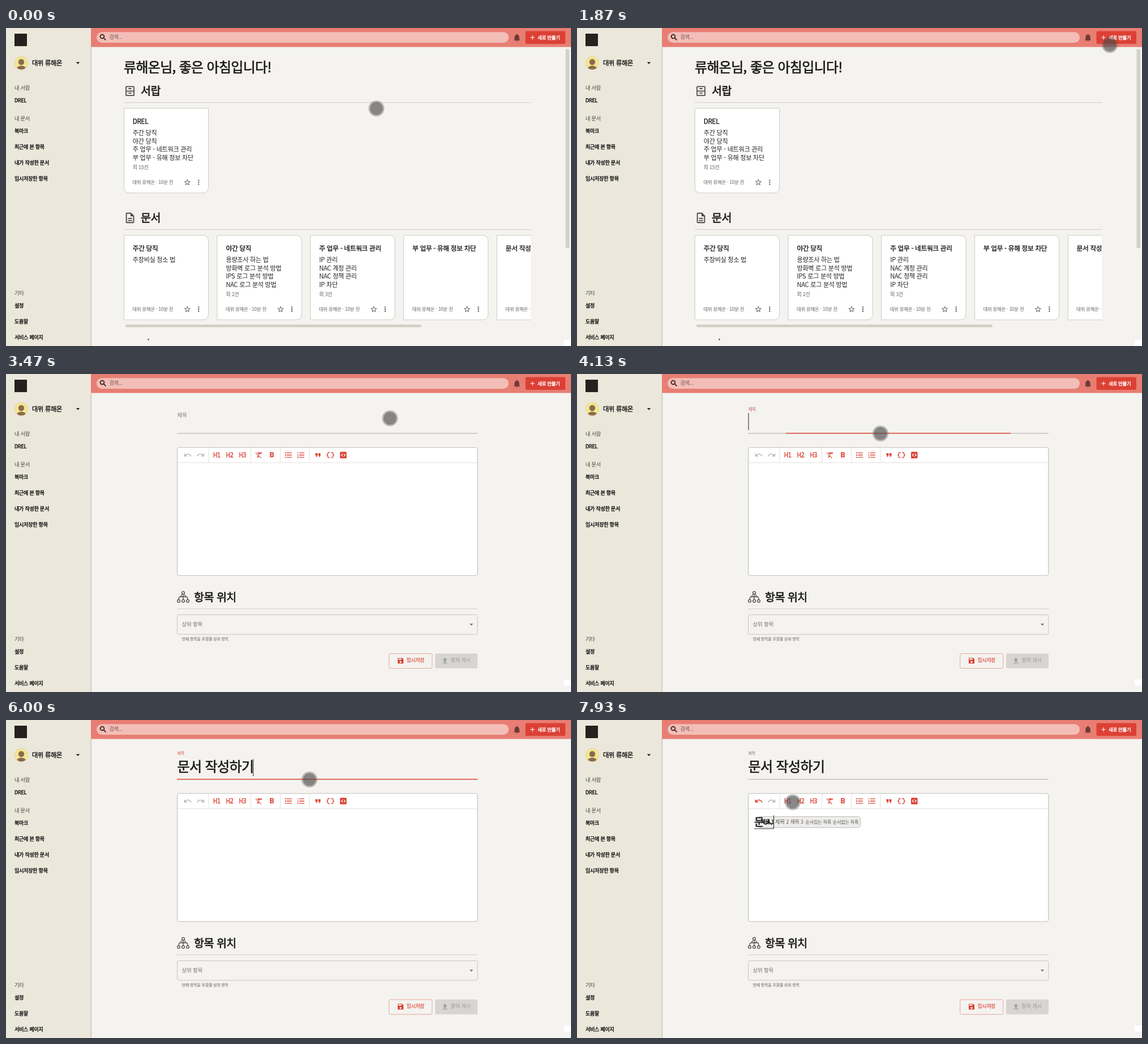
Write an HTML page that moves like this. It is 998 by 561 pixels and loops after 8000 ms.

```html
<!DOCTYPE html>
<html lang="ko">
<head>
<meta charset="utf-8">
<title>문서 작성하기</title>
<style>
html, body { margin: 0; width: 100%; height: 100%; overflow: hidden; background: #f4f3ef; }
svg { display: block; width: 100%; height: 100%; }
text { font-family: "Noto Sans CJK KR", "Noto Sans CJK", sans-serif; letter-spacing: -.025em; white-space: pre; }
.mono { font-family: "Noto Sans Mono", monospace; }
</style>
</head>
<body>
<svg id="stage" viewBox="0 0 998 561" xmlns="http://www.w3.org/2000/svg"></svg>
<script>
const LOOP = 8000;
const INK = '#1a1918', RED = '#dc4034', GREY = '#74736f', LINE = '#cfcecb';
const USER = '류해온', TEAM = 'DREL';

const ICONS = {
  undo: 'M12.5 8c-2.65 0-5.05.99-6.9 2.6L2 7v9h9l-3.62-3.62c1.39-1.16 3.16-1.88 5.12-1.88 3.54 0 6.55 2.31 7.6 5.5l2.37-.78C21.08 11.03 17.15 8 12.5 8z',
  clear: 'M3.27 5L2 6.27l6.97 6.97L6.5 19h3l1.57-3.66L16.73 21 18 19.73 3.55 5.27zM6 5v.18L8.82 8h2.4l-.72 1.68 2.1 2.1L14.21 8H20V5z',
  bold: 'M15.6 10.79c.97-.67 1.65-1.77 1.65-2.79 0-2.26-1.75-4-4-4H7v14h7.04c2.09 0 3.71-1.7 3.71-3.79 0-1.52-.86-2.82-2.15-3.42zM10 6.5h3c.83 0 1.5.67 1.5 1.5s-.67 1.5-1.5 1.5h-3zm3.5 9H10v-3h3.5c.83 0 1.5.67 1.5 1.5s-.67 1.5-1.5 1.5z',
  bullets: 'M2.5 4.5h3v3h-3zM2.5 10.5h3v3h-3zM2.5 16.5h3v3h-3zM7 5h14v2H7zM7 11h14v2H7zM7 17h14v2H7z',
  numbers: 'M2 17h2v.5H3v1h1v.5H2v1h3v-4H2zm1-9h1V4H2v1h1zm-1 3h1.8L2 13.1v.9h3v-1H3.2L5 10.9V10H2zM7 5v2h14V5zm0 14h14v-2H7zm0-6h14v-2H7z',
  quote: 'M6 17h3l2-4V7H5v6h3zm8 0h3l2-4V7h-6v6h3z',
  brace: 'M4 7v2c0 .55-.45 1-1 1H2v4h1c.55 0 1 .45 1 1v2c0 1.65 1.35 3 3 3h3v-2H7c-.55 0-1-.45-1-1v-2c0-1.3-.84-2.42-2-2.83v-.34C5.16 11.42 6 10.3 6 9V7c0-.55.45-1 1-1h3V4H7C5.35 4 4 5.35 4 7z',
  star: 'M22 9.24l-7.19-.62L12 2 9.19 8.63 2 9.24l5.46 4.73L5.82 21 12 17.27 18.18 21l-1.63-7.03zM12 15.4l-3.76 2.27 1-4.28-3.32-2.88 4.38-.38L12 6.1l1.71 4.04 4.38.38-3.32 2.88 1 4.28z',
  more: 'M10.2 4.2h3.6v3.6h-3.6zM10.2 10.2h3.6v3.6h-3.6zM10.2 16.2h3.6v3.6h-3.6z',
  search: 'M15.5 14h-.79l-.28-.27C15.41 12.59 16 11.11 16 9.5 16 5.91 13.09 3 9.5 3S3 5.91 3 9.5 5.91 16 9.5 16c1.61 0 3.09-.59 4.23-1.57l.27.28v.79l5 4.99L20.49 19zm-6 0C7.01 14 5 11.99 5 9.5S7.01 5 9.5 5 14 7.01 14 9.5 11.99 14 9.5 14z',
  bell: 'M12 22c1.1 0 2-.9 2-2h-4c0 1.1.89 2 2 2zm6-6v-5c0-3.07-1.64-5.64-4.5-6.32V4c0-.83-.67-1.5-1.5-1.5s-1.5.67-1.5 1.5v.68C7.63 5.36 6 7.92 6 11v5l-2 2v1h16v-1z',
  down: 'M7 10l5 5 5-5z',
  add: 'M19 13h-6v6h-2v-6H5v-2h6V5h2v6h6z',
  save: 'M17 3H5c-1.11 0-2 .9-2 2v14c0 1.1.89 2 2 2h14c1.1 0 2-.9 2-2V7zm-5 16c-1.66 0-3-1.34-3-3s1.34-3 3-3 3 1.34 3 3-1.34 3-3 3zm3-10H5V5h10z',
  publish: 'M9 16h6v-6h4l-7-7-7 7h4zm-4 2h14v2H5z',
  doc: 'M8 16h8v2H8zm0-4h8v2H8zm6-10H6c-1.1 0-2 .9-2 2v16c0 1.1.89 2 1.99 2H18c1.1 0 2-.9 2-2V8zm4 18H6V4h7v5h5z',
  drawer: 'M5 2h14c1.1 0 2 .9 2 2v16c0 1.1-.9 2-2 2H5c-1.1 0-2-.9-2-2V4c0-1.1.9-2 2-2zM5 4v7h14V4zM5 13v7h14v-7zM9 6h6v2.2H9zM9 15h6v2.2H9z'
};

// cx, cy: centre of the icon; bold: outline width that thickens the glyphs
const text = (x, cy, str, size, fill = INK, bold = 0, extra = '') =>
  `<text x="${x}" y="${cy + size * .37}" font-size="${size}" fill="${fill}" stroke="${fill}" stroke-width="${bold}" ${extra}>${str}</text>`;
const icon = (name, cx, cy, size, fill, flip = 1, extra = '') =>
  `<path d="${ICONS[name]}" fill="${fill}" fill-rule="evenodd" ${extra} transform="translate(${cx} ${cy}) scale(${flip * size / 24} ${size / 24}) translate(-12 -12)"/>`;
const rect = (x, y, w, h, fill, r = 0, extra = '') =>
  `<rect x="${x}" y="${y}" width="${w}" height="${h}" rx="${r}" fill="${fill}" ${extra}/>`;
const outline = (color, w = 1) => `stroke="${color}" stroke-width="${w}"`;

function sidebar() {
  const label = (y, s) => text(15, y, s, 9.2, '#5a5953', .1);
  const item = (y, s) => text(15, y, s, 9, '#100f0e', .4);
  return rect(0, 0, 150, 561, '#ebe8db') +
    rect(149.5, 34, 2.5, 527, 'url(#edge)') +
    rect(15, 10, 22, 22, '#26211f') +
    `<circle cx="27" cy="62" r="11.7" fill="#f2e690" ${outline('#d9cf86', .6)}/>
     <g clip-path="url(#face)" fill="#8b6a4e"><circle cx="27" cy="60" r="5.2"/><ellipse cx="27" cy="73" rx="9" ry="6.5"/></g>` +
    text(46, 62, '대위 ' + USER, 11.2, '#100f0e', .35) +
    icon('down', 127, 61.5, 16, '#161513') +
    label(106, '내 서랍') + item(128, TEAM) + label(160, '내 문서') +
    ['북마크', '최근에 본 항목', '내가 작성한 문서', '임시저장한 항목'].map((s, i) => item(182 + 28 * i, s)).join('') +
    label(468, '기타') +
    ['설정', '도움말', '서비스 페이지'].map((s, i) => item(490 + 28 * i, s)).join('');
}

function topbar() {
  return rect(150, 0, 848, 33.5, '#e87e73') +
    rect(160, 7.3, 728, 18.7, '#f3beb7', 9.35) +
    icon('search', 171.5, 16.5, 15, '#2b1614', 1, outline('#2b1614', .7)) +
    text(182.5, 16, '검색...', 9, '#7d5f5c', .1) +
    icon('bell', 902.5, 17, 16.5, '#6c3a35') +
    rect(917.5, 5.5, 70.5, 22.5, '#dc4034', 2) +
    icon('add', 930, 16.7, 13, '#fff') +
    text(939, 16.5, '새로 만들기', 8.4, '#fff', .35);
}

function card(x, y, title, lines, more, drawer) {
  const w = 149.2, b = y + w, r = x + w;
  const shape = drawer
    ? `M${x} ${y}H${r}V${b - 10}q0 10-10 10H${x + 10}q-10 0-10-10z`
    : `M${x} ${y}H${r - 10}q10 0 10 10V${b - 10}q0 10-10 10H${x}z`;
  const end = y + 44 + 14.4 * lines.length;
  return `<path d="${shape}" fill="#fff" ${outline('#cbcac7')}/>` +
    text(x + 15.5, y + 23, title, 11.65, INK, .35) +
    lines.map((s, i) => text(x + 15.5, y + 43.5 + 14.4 * i, s, 11.1, '#222120')).join('') +
    (more ? text(x + 15.5, end + 2, more, 8.9, GREY, .1) : '') +
    text(x + 15, b - 18.8, `대위 ${USER} · 10분 전`, 8.4, GREY, .1) +
    icon('star', x + 112, b - 18.8, 14, '#5f5e5b') +
    icon('more', x + 132, b - 18.8, 14, '#5f5e5b');
}

function home() {
  const duty = ['주간 당직', '야간 당직', '주 업무 - 네트워크 관리', '부 업무 - 유해 정보 차단'];
  const docs = [
    [duty[0], ['주장비실 청소 법']],
    [duty[1], ['용량조사 하는 법', '방화벽 로그 분석 방법', 'IPS 로그 분석 방법', 'NAC 로그 분석 방법'], '외 2건'],
    [duty[2], ['IP 관리', 'NAC 계정 관리', 'NAC 정책 관리', 'IP 차단'], '외 3건'],
    [duty[3], []],
    ['문서 작성하기', []]
  ];
  return text(208, 69, USER + '님, 좋은 아침입니다!', 23.9, INK, .65) +
    icon('drawer', 219, 111.3, 21, '#4a4947') + text(238, 111, '서랍', 19.5, INK, .65) +
    rect(208, 131, 719, 1, LINE) +
    card(208.3, 141.8, TEAM, duty, '외 15건', true) +
    icon('doc', 219, 335, 22, '#4a4947') + text(238, 334.5, '문서', 19.5, INK, .65) +
    rect(208, 355, 719, 1, LINE) +
    `<g clip-path="url(#shelf)">${docs.map((d, i) => card(208.3 + 164.7 * i, 365.7, ...d)).join('')}</g>` +
    rect(211, 523.3, 523, 4.4, '#d0cec5', 2) +
    rect(988.5, 37, 6.5, 351.5, '#d2d0c8', 3) +
    rect(250.5, 548.5, 2, 2, INK) +
    rect(985, 550, 13, 11, '#fff');
}

function treeIcon() {
  const dots = [[313, 386], [305, 400.5], [313, 400.5], [321, 400.5]];
  return `<g fill="none" ${outline('#4a4947', 1.3)}>` +
    dots.map(([x, y]) => `<circle cx="${x}" cy="${y}" r="2.4"/>`).join('') +
    '<path d="M313 388.5V398M305 398q0-5 3-5h10q3 0 3 5M308 393l3-4.5M318 393l-3-4.5"/></g>';
}

function editor() {
  const y = 143;
  return rect(302, 104.2, 531, 1, '#aeadaa') +
    `<rect id="focus" x="302" y="103.7" height="1.7" fill="#de5348"/>` +
    text(0, 0, '제목', 9.4, GREY, 0, 'id="label"') +
    text(302.5, 82.5, '', 24, INK, .6, 'id="title"') +
    rect(302.5, 129.5, 530.3, 226, '#fff', 4, outline('#c4c3c0', 1.2)) +
    rect(303, 156, 529.5, 1, '#e3e2e0') +
    [358, 432.5, 484.5, 536].map(x => rect(x - .5, 130, 1, 26, '#e3e2e0')).join('') +
    icon('undo', 321, y, 15.5, '#bbb', 1, 'id="undo"') + icon('undo', 343.7, y, 15.5, '#bbb', -1) +
    ['H1', 'H2', 'H3'].map((s, i) => text(366 + 22.8 * i, y, s, 11.8, RED, .25, 'class="mono" style="letter-spacing:-.8px"')).join('') +
    ['clear', 'bold', 'bullets', 'numbers', 'quote', 'brace'].map((n, i) => icon(n, [447, 469.5, 499, 521, 551, 573][i], y, 15.5, RED)).join('') +
    icon('brace', 573, y, 15.5, RED, -1) +
    rect(590, 137.3, 11.5, 11.5, RED, 1.5) +
    `<path d="M594.8 140.6l-2.4 2.4 2.4 2.4M596.7 140.6l2.4 2.4-2.4 2.4" fill="none" ${outline('#fff', 1.2)}/>` +
    `<g id="menu">${rect(319, 170.3, 181.7, 19.5, '#eeedec', 5, outline('#bab9b7'))}` +
    text(325, 179.7, '제목 1', 8.8, INK, .45) + text(350, 179.7, '제목 2', 9.4, '#5c5b59') + text(377, 179.7, '제목 3', 8.8, '#5c5b59') +
    text(403.5, 179.7, '순서있는 목록', 8.1, '#5c5b59') + text(451.7, 179.7, '순서없는 목록', 8.1, '#5c5b59') + '</g>' +
    text(313, 179.5, '', 19, INK, .5, 'id="body"') +
    treeIcon() + text(332, 394, '항목 위치', 19.5, INK, .65) +
    rect(302, 413.7, 531, 1, LINE) +
    rect(302.5, 424.7, 530.3, 34.5, 'none', 2.5, outline('#c6c5c1')) +
    text(310.5, 441, '상위 항목', 9.5, GREY) + icon('down', 822, 441.8, 15, '#6a6967') +
    text(310.5, 467, '현재 항목을 포함할 상위 항목', 7, GREY, .1) +
    rect(676.7, 493.3, 76, 26, 'none', 2.5, outline('#eaa59e')) +
    icon('save', 697, 505.8, 13.5, RED) + text(707.5, 505, '임시저장', 8.8, RED, .15) +
    rect(758, 493, 75, 26.3, '#d6d5d1', 2.5) +
    icon('publish', 775.3, 505.8, 14, '#a09f9c') + text(785.5, 505, '항목 게시', 9.2, '#a5a4a1', .15) +
    rect(985, 539, 13, 11, '#fff') +
    ['Title', 'Body'].map(n => `<rect id="under${n}" height="1" fill="#3a3938"/><rect id="caret${n}" width="1" fill="#1f1e1d"/>`).join('');
}

const stage = document.getElementById('stage');
stage.innerHTML = `<defs>
  <linearGradient id="edge"><stop offset="0" stop-color="#8a8880" stop-opacity=".5"/><stop offset="1" stop-color="#8a8880" stop-opacity="0"/></linearGradient>
  <clipPath id="face"><circle cx="27" cy="62" r="11.2"/></clipPath>
  <clipPath id="shelf"><rect x="207" y="360" width="720" height="160"/></clipPath>
</defs>
<g id="home">${home()}</g><g id="form">${editor()}</g>${sidebar()}${topbar()}
<g id="cursor"><circle r="14" fill="#505050" fill-opacity=".36"/><circle r="11.3" fill="#484848" fill-opacity=".46"/></g>`;

const $ = id => document.getElementById(id);
const set = (id, attrs) => { for (const k in attrs) $(id).setAttribute(k, attrs[k]); };
const show = (id, on) => set(id, { visibility: on ? 'visible' : 'hidden' });
const span = (t, a, b) => Math.min(1, Math.max(0, (t - a) / (b - a)));
const easeOut = p => 1 - (1 - p) ** 3;
const easeInOut = p => p * p * (3 - 2 * p);
const mix = (a, b, p) => a + (b - a) * p;

// time, typed text, whether the last letter is still being composed
const TITLE = [[4800, '무', 1], [4870, '문', 1], [5000, '문ㅅ', 1], [5130, '문서', 1], [5270, '문서 ', 0], [5330, '문서 자', 1],
  [5400, '문서 작', 1], [5470, '문서 작ㅅ', 1], [5530, '문서 작서', 1], [5600, '문서 작성', 1], [5670, '문서 작성ㅎ', 1],
  [5730, '문서 작성하', 1], [5870, '문서 작성하ㄱ', 1], [5930, '문서 작성하기', 1], [6000, '문서 작성하기', 0]];
const BODY = [[7600, 'ㅁ', 1], [7670, '무', 1], [7800, '문', 1], [7930, '문ㅅ', 1]];

const advance = (str, size) => [...str].reduce((w, c) => w + (c === ' ' ? .2 : .895) * size, 0);

function type(t, keys, name, x, top, size, from, to, wide) {
  const [at, str, open] = keys.filter(k => k[0] <= t).pop() || [from, '', 0];
  const w = advance(str, size), head = wide ? 0 : advance(str.slice(0, -1), size);
  const active = t >= from && t < to;
  $(name.toLowerCase()).textContent = str;
  set('caret' + name, { x: x + w, y: top, height: size * 1.25 });
  show('caret' + name, active && (t - at) % 1000 < 500);
  set('under' + name, { x: x + head, y: top + size * 1.21, width: w - head });
  show('under' + name, active && open);
}

// loops drawn around the button, one point every 120 ms from 1630
const SWIRL = [[955, 23], [946, 25], [941, 30], [955, 37], [975, 32], [978, 21], [966, 17], [958, 24], [948, 27], [946, 32], [970, 32], [960, 25]];

function swirl(t) {
  const last = SWIRL.length - 1, s = Math.min(last, Math.max(0, (t - 1630) / 120));
  const i = Math.min(last - 1, Math.floor(s)), u = s - i;
  const at = j => SWIRL[Math.min(last, Math.max(0, j))];
  return [0, 1].map(k => {
    const [a, b, c, d] = [at(i - 1), at(i), at(i + 1), at(i + 2)].map(p => p[k]);
    return b + u / 2 * (c - a + u * (2 * a - 5 * b + 4 * c - d + u * (3 * (b - c) + d - a)));
  });
}

function pointer(t) {
  const go = (a, b, p) => [mix(a[0], b[0], p), mix(a[1], b[1], p)];
  if (t < 1630) return go([654.3, 142], [955, 23], easeInOut(span(t, 280, 1080)));
  if (t < 3270) return swirl(t);
  if (t < 6400) return go([960, 25], [536, 105], easeOut(span(t, 3265, 3940)));
  return go([536, 105], [381, 145], easeInOut(span(t, 6410, 6960)));
}

function draw(t) {
  show('home', t < 3330);
  $('form').style.display = t < 3330 ? 'none' : '';
  set('cursor', { transform: `translate(${pointer(t).join(' ')})` });

  const lift = easeOut(span(t, 4050, 4270));
  const focus = lift * (1 - easeOut(span(t, 7180, 7390)));
  const tint = `rgb(${mix(124, 222, focus)},${mix(123, 83, focus)},${mix(120, 72, focus)})`;
  set('label', { transform: `translate(302.5 ${mix(73, 58, lift)}) scale(${mix(1, .75, lift)})`, fill: tint, stroke: tint });
  set('focus', { x: 567.5 - 265.5 * focus, width: 531 * focus });

  type(t, TITLE, 'Title', 302.5, 69, 24, 4070, 7200);
  type(t, BODY, 'Body', 313, 168.3, 19, 7260, LOOP, true);
  show('menu', t >= 7270);
  set('undo', { fill: t >= 7330 ? RED : '#bbb' });
}

function tick() {
  draw(performance.now() % LOOP);
  requestAnimationFrame(tick);
}
tick();
</script>
</body>
</html>
```
